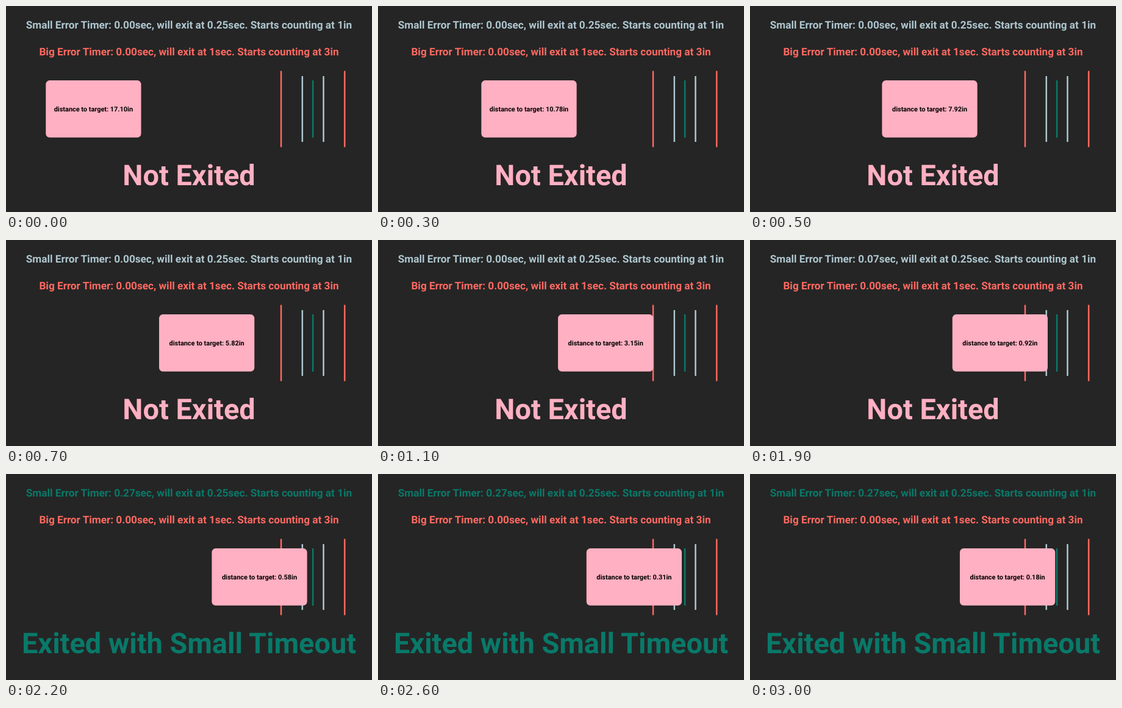
These frames come from a looping animation (600 by 338 pixels, 3100 ms). An HTML page:

```html
<!DOCTYPE html>
<html lang="en">
<head>
<meta charset="utf-8">
<title>Exit conditions</title>
<style>
  html, body { margin: 0; height: 100%; overflow: hidden; background: #252525; }
  svg { display: block; width: 100vw; height: 100vh; }
  text { font: 700 17.1875px Roboto, sans-serif; text-anchor: middle; text-rendering: geometricPrecision; }
  line { stroke-width: 2.5; }
  #status { font-size: 46.875px; }
  #label { font-size: 10.9375px; }
</style>
</head>
<body>
<svg viewBox="0 0 600 338">
  <text id="small" x="300" y="37.2"></text>
  <text id="big" x="300" y="81" fill="#ff6961"></text>
  <g stroke="#ff6961">
    <line x1="451" x2="451" y1="106.5" y2="231.5"/>
    <line x1="555.2" x2="555.2" y1="106.5" y2="231.5"/>
  </g>
  <g stroke="#aec6cf">
    <line x1="485.8" x2="485.8" y1="115" y2="223"/>
    <line x1="520.5" x2="520.5" y1="115" y2="223"/>
  </g>
  <line x1="503.1" x2="503.1" y1="122" y2="216" stroke="#097969"/>
  <g id="box">
    <rect y="122.1" width="156.25" height="93.75" rx="6.25" fill="#ffb0c2"/>
    <text id="label" x="78.125" y="172.5"></text>
  </g>
  <text id="status" x="300" y="294"></text>
</svg>
<script>
const LOOP = 3100, HOLD = 100, FPS = 30;
const PINK = '#ffb0c2', BLUE = '#aec6cf', GREEN = '#097969';
const START = 17.1, DECAY = 0.95, PX_PER_INCH = 16.47;
const BIG_ERROR = 3, SMALL_ERROR = 1, SMALL_EXIT = 0.25;
const el = id => document.getElementById(id);

function setText(id, text, fill) {
  el(id).textContent = text;
  if (fill) el(id).setAttribute('fill', fill);
}

// Replay the control loop up to a tick: the error shrinks 5% per tick.
function simulate(ticks) {
  let error = START, small = 0, big = 0, exited = false;
  for (let i = 0; i < ticks; i++) {
    error *= DECAY;
    if (exited) continue;
    if (error < SMALL_ERROR) {
      small += 1 / FPS;
      big = 0;
    } else if (error < BIG_ERROR) {
      big += 1 / FPS;
    }
    exited = small > SMALL_EXIT;
  }
  return { error, small, big, exited };
}

function draw() {
  const step = Math.floor(performance.now() % LOOP / HOLD);
  const { error, small, big, exited } = simulate(Math.min(step * 3, 89));
  setText('small', `Small Error Timer: ${small.toFixed(2)}sec, will exit at 0.25sec. Starts counting at 1in`, exited ? GREEN : BLUE);
  setText('big', `Big Error Timer: ${big.toFixed(2)}sec, will exit at 1sec. Starts counting at 3in`);
  setText('label', `distance to target: ${error.toFixed(2)}in`);
  setText('status', exited ? 'Exited with Small Timeout' : 'Not Exited', exited ? GREEN : PINK);
  el('box').setAttribute('transform', `translate(${346.9 - error * PX_PER_INCH})`);
  requestAnimationFrame(draw);
}
draw();
</script>
</body>
</html>
```
